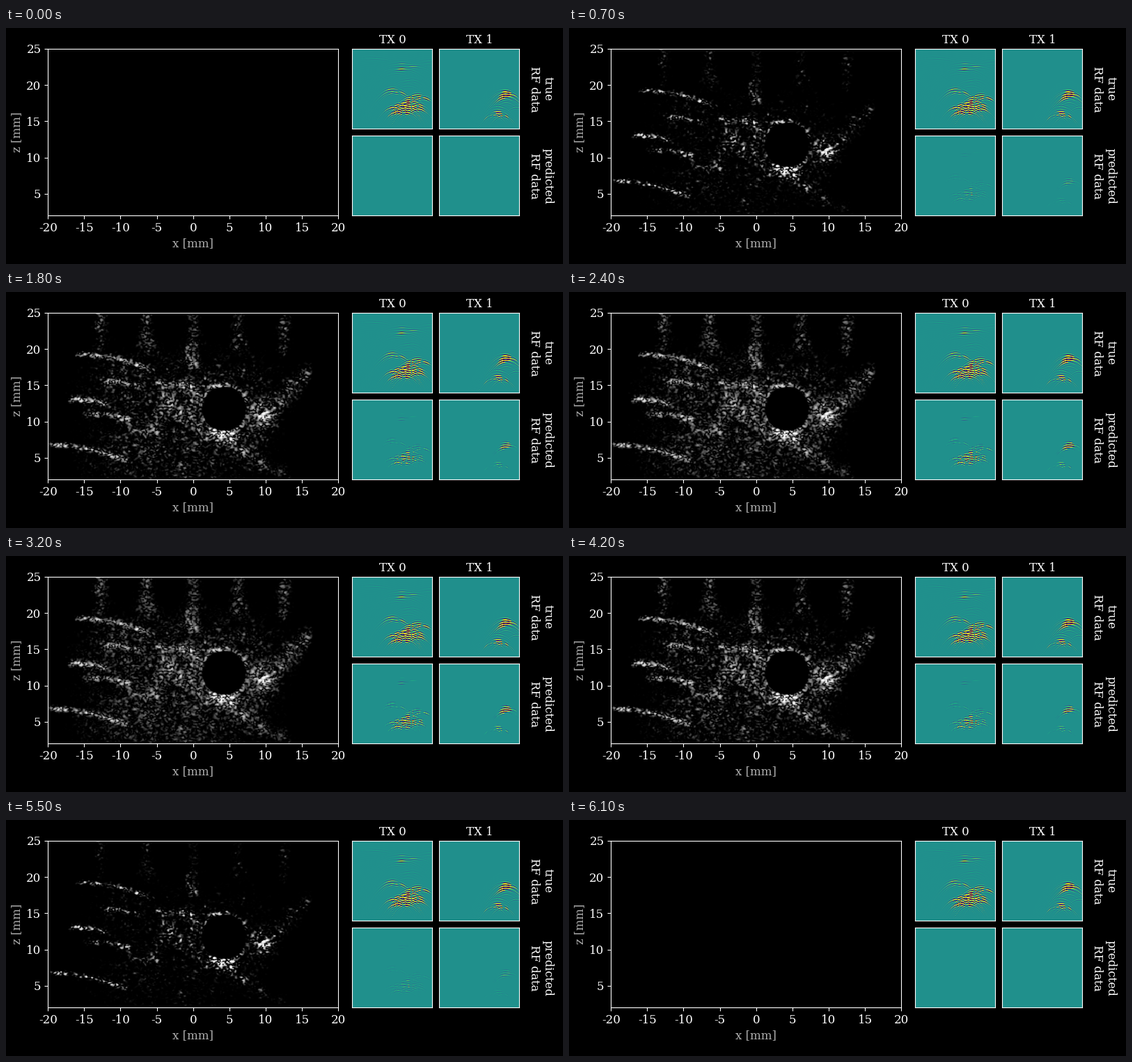
A matplotlib script that plays this animation: 800x340 px, repeating every 6.2 s.

```python
import numpy as np
import matplotlib.pyplot as plt
from matplotlib.animation import FuncAnimation

plt.rcParams.update({
    "font.family": "DejaVu Serif", "font.size": 12,
    "axes.unicode_minus": False, "text.color": "white",
    "axes.edgecolor": "white", "axes.facecolor": "black",
    "xtick.color": "white", "ytick.color": "white",
})

W, H = 800, 340
FRAMES, INTERVAL = 62, 100
LAST = FRAMES // 2 - 1
NX, NZ, NRF = 417, 240, 115
rng = np.random.default_rng(11)

x, z = np.meshgrid(np.linspace(-20, 20, NX), np.linspace(2, 25, NZ))


def ridge(d, w):
    return np.exp(-(d / w) ** 2)


def step(d, w):
    return .5 + .5 * np.tanh(d / w)


def spot(cx, cz, w, h):
    return ridge(x - cx, w) * ridge(z - cz, h)


def fibre(x0, z0, length):
    """Thin layer that bends downwards from its left end."""
    span = step(x - x0, .4) * step(x0 + length - x, .4)
    return ridge(z - z0 + .02 * (x - x0) ** 2, .35) * span


def blur(a, sz, sx):
    def kernel(n, s):
        i = np.arange(n)
        return np.exp(-.5 * ((i[:, None] - i) / s) ** 2)
    return kernel(a.shape[0], sz) @ a @ kernel(a.shape[1], sx)


def speckle(sz, sx):
    re, im = (blur(n, sz, sx) for n in rng.normal(size=(2, NZ, NX)))
    mag = np.hypot(re, im)
    return mag / mag.mean()


def reflectivity():
    s = .13 * np.exp(-((x + 2) / 13) ** 4 - ((z - 10) / 9.5) ** 4)
    for cx in np.linspace(-12.7, 12.5, 5):
        s += .14 * ridge(x - cx, 1) * step(z - 19.5, 1.5)
    for start in ((-16.2, 19.2, 11), (-5, 15.3, 6), (-12.3, 15.4, 5),
                  (-17, 13, 5), (-14.5, 11, 6), (-9, 8.6, 4), (-20, 6.8, 11)):
        s += .34 * fibre(*start)

    s += .32 * spot(9.5, 10.9, 1.7, 1.6)
    s += .18 * spot(-3, 11.5, 1.6, 1.6)
    s += .32 * spot(0, 13, .9, 1.7)
    s += .25 * spot(0, 18, .9, 1)
    s += .5 * spot(4.5, 8, 1.9, .8)
    # Oblique bands on the right
    s += .2 * ridge(z - 11 - .85 * (x - 9.5), 1.6) * step(x - 9, 1) * step(16 - x, .5)
    s += .14 * ridge(z - 8 + .55 * (x - 3), 1) * step(x, 1) * step(13 - x, 1)

    # Vessel: bright rim, almost empty inside
    dx, dz = x - 4.2, z - 11.7
    r = np.hypot(dx, dz)
    s += .5 * ridge(r - 3.25, .35) * (dz / r) ** 2
    return s * (.06 + .94 * step(r - 3, .12))


TARGET = reflectivity() * speckle(1.3, 1.5) ** 1.3 * speckle(7, 8) ** .4


def tissue(k):
    # Strong reflectors converge first
    return np.tanh(TARGET * (1 - np.exp(-(k * TARGET / 3.5) ** 2)))


# Reflector groups: u, v, spread, echoes, strength
GROUPS = [
    [(78, 81, 9, 22, 1.3), (95, 70, 4, 5, 1), (61, 62, 4, 5, .9),
     (74, 26, 7, 6, .5), (70, 40, 25, 14, .12)],
    [(96, 67, 4, 9, 1.2), (80, 94, 4, 6, .7), (90, 85, 8, 6, .3)],
]


def rf(groups):
    v, u = np.mgrid[:NRF, :NRF] + .5
    out = np.zeros((NRF, NRF))
    for cu, cv, spread, n, amp in groups:
        for _ in range(n):
            u0, v0 = rng.normal((cu, cv), (spread, .6 * spread))
            du = u - u0
            d = v - v0 - 4e-4 * v0 * du ** 2
            fade = (1 + (du / rng.uniform(8, 14)) ** 2) ** -1.5
            out += amp * fade * ridge(d, 2.8) * np.cos(2 * np.pi * d / 3)
    return out


def predicted(data, k):
    return .8 * k / LAST * np.sign(data) * np.maximum(np.abs(data) - .3, 0)


fig = plt.figure(figsize=(W / 100, H / 100), dpi=100, facecolor="black")


def add_axes(left, top, w, h):
    return fig.add_axes([left / W, 1 - (top + h) / H, w / W, h / H])


main = add_axes(60.2, 30, NX, NZ)
scan = main.imshow(np.zeros((NZ, NX)), cmap="gray", vmin=0, vmax=1,
                   origin="lower", extent=(-20, 20, 2, 25), aspect="auto",
                   interpolation="nearest")
main.set_xticks(range(-20, 21, 5))
main.set_yticks(range(5, 26, 5))
main.set_xlabel("x [mm]", color="#b0b0b0")
main.set_ylabel("z [mm]", color="#b0b0b0")


def rf_panel(left, top, data):
    ax = add_axes(left, top, NRF, NRF)
    ax.set_xticks([])
    ax.set_yticks([])
    return ax, ax.imshow(data, cmap="viridis", vmin=-1, vmax=1,
                         aspect="auto", interpolation="nearest")


true_rf = [rf(g) for g in GROUPS]
guesses = []
for i, data in enumerate(true_rf):
    left = 497.4 + 125 * i
    ax, _ = rf_panel(left, 30, data)
    ax.set_title(f"TX {i}", fontsize=12)
    guesses.append(rf_panel(left, 155, np.zeros_like(data))[1])

for y, name in ((88, "true"), (213, "predicted")):
    fig.text(768 / W, 1 - y / H, name + "\nRF data", rotation=270,
             ha="center", va="center", multialignment="center")

scans = [tissue(k) for k in range(LAST + 1)]


def update(i):
    k = min(i, FRAMES - 1 - i)
    scan.set_data(scans[k])
    for im, data in zip(guesses, true_rf):
        im.set_data(predicted(data, k))
    return [scan, *guesses]


anim = FuncAnimation(fig, update, frames=FRAMES, interval=INTERVAL,
                     repeat=True, repeat_delay=0)
plt.show()
```
